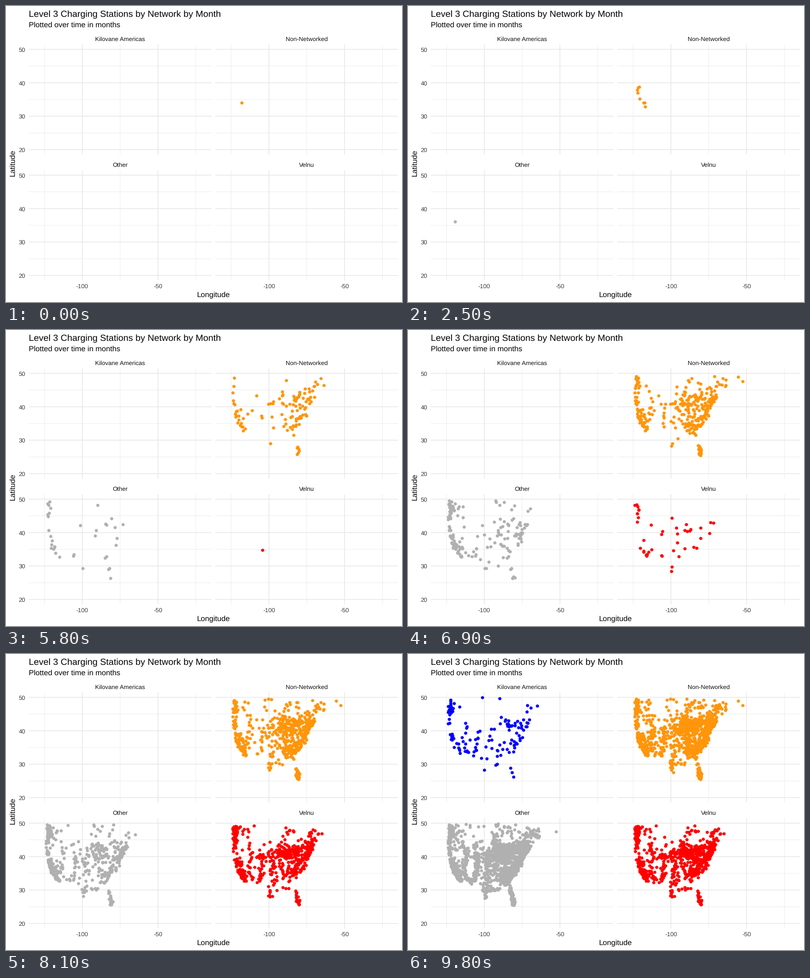
A matplotlib script for the animation above (10000 ms loop, 800 by 600 pixels).

```python
import matplotlib.pyplot as plt
import numpy as np
from matplotlib.animation import FuncAnimation
from matplotlib.collections import LineCollection
from matplotlib.path import Path

W, H, DPI = 800, 600, 100
STEP, FRAMES = 100, 100
PANEL_W, PANEL_H = 369.4, 223.2
LEFT, TOP = 45.9, 77.9
COL, ROW = 377.05, 255

rng = np.random.default_rng(5)
plt.rcParams["font.family"] = "Liberation Sans"
plt.rcParams["text.hinting"] = "none"

# Panel name, colour, column, row
PANELS = {
    "fast": ("Kilovane Americas", "#0000ff", 0, 0),
    "free": ("Non-Networked", "#ff950a", 1, 0),
    "other": ("Other", "#b0b0b0", 0, 1),
    "brand": ("Velnu", "#ff0000", 1, 1),
}

# Map positions are pixels of the first panel.
LAND = Path([
    (74, 92), (80, 87.5), (245, 87.5), (272, 104), (270, 115), (255, 126),
    (244, 142), (236, 152), (231, 164), (230, 178), (215, 197), (207, 208),
    (208, 222), (217, 244), (215, 255), (210, 254), (204, 225), (182, 226),
    (166, 225), (157, 246), (148, 224), (122, 212), (103, 205), (90, 186),
    (81, 152), (80, 105),
])

# Routes with stations along them: weight, spread, key points
WEST = [
    (5, 2.5, [(85, 95), (87, 108), (83, 120)]),
    (1.5, 2.5, [(83, 120), (82, 150), (85, 165)]),
    (6, 2.5, [(86, 163), (89, 180), (97, 195), (107, 204)]),
    (3, 3, [(87, 168), (93, 163), (103, 194)]),
    (1.5, 7, [(88, 95), (108, 102), (96, 120), (97, 160)]),
]
MID = [
    (3, 3, [(110, 130), (119, 152), (110, 180), (118, 200), (131, 207)]),
    (3, 2.5, [(128, 158), (140, 150), (140, 164), (135, 208)]),
    (3, 5, [(160, 140), (161, 190), (160, 213), (152, 222)]),
    (1.2, 2, [(157, 240), (154, 223), (185, 222)]),
    (1.5, 9, [(120, 140), (140, 120), (150, 165), (125, 190)]),
    (0.5, 4, [(105, 92), (170, 92), (235, 92)]),
]
EAST = [
    (4, 4, [(240, 135), (236, 147), (225, 161)]),
    (4, 6, [(175, 128), (188, 143), (202, 140), (218, 138), (237, 124)]),
    (5, 10, [(170, 152), (190, 152), (215, 155)]),
    (4, 7, [(225, 165), (216, 184), (203, 190), (192, 205)]),
    (2.5, 11, [(178, 175), (190, 195), (205, 175)]),
    (1.8, 2, [(207, 222), (212, 238), (215, 253), (208, 242)]),
    (1, 5, [(237, 124), (247, 103), (262, 112)]),
    (0.7, 5, [(175, 118), (200, 100), (225, 108)]),
]

# Panel, start, end, new stations in the west, the middle and the east
GROWTH = [
    ("free", 4300, 5800, 14, 12, 78),
    ("free", 5800, 6900, 48, 18, 150),
    ("free", 6900, 8100, 32, 45, 150),
    ("free", 8100, 9800, 70, 120, 300),
    ("other", 4500, 5800, 16, 5, 14),
    ("other", 5800, 6900, 60, 20, 50),
    ("other", 6900, 8100, 85, 55, 150),
    ("other", 8100, 9800, 200, 230, 850),
    ("brand", 5900, 6900, 17, 13, 15),
    ("brand", 6900, 8100, 110, 90, 310),
    ("brand", 8100, 9800, 35, 60, 110),
    ("fast", 8700, 9800, 42, 35, 60),
]

# First and outlying stations: x, y, opening time
stations = {
    "free": [
        (98.5, 196, 0), (102, 203.5, 900), (90, 164, 1000), (86, 170, 1500),
        (88, 165, 1600), (87, 176, 1700), (91, 187.5, 1900),
        (101, 195.5, 2200), (236, 125, 2900), (265, 112, 3400),
        (215, 131.5, 3700), (216, 125.5, 3900), (290, 95, 6400),
        (298.5, 104, 6800),
    ],
    "other": [(90, 162.5, 4500), (298.5, 104.5, 9400)],
    "brand": [],
    "fast": [],
}

# Lone dots gliding between two places: start, end, times
GLIDES = {
    "free": ((98.5, 196), (90, 164), 100, 1000),
    "other": ((98.3, 194.2), (90.4, 164.6), 1000, 4500),
    "brand": ((96, 190), (163.5, 191.5), 5600, 5900),
}


def along(points, u):
    """Positions at shares u of the length of a polyline."""
    points = np.array(points, float)
    steps = np.hypot(*np.diff(points, axis=0).T)
    s = np.append(0, np.cumsum(steps)) / steps.sum()
    return np.column_stack([np.interp(u, s, p) for p in points.T])


def scatter(routes, count):
    """Random places on land near the routes."""
    weights = np.array([r[0] for r in routes])
    shares = rng.multinomial(4 * count, weights / weights.sum())
    places = np.vstack([
        along(points, rng.random(n)) + rng.normal(0, spread, (n, 2))
        for n, (_, spread, points) in zip(shares, routes)])
    places = places[LAND.contains_points(places)]
    return rng.permutation(places)[:count]


for key, start, end, *counts in GROWTH:
    for routes, count in zip((WEST, MID, EAST), counts):
        places = scatter(routes, count)
        # More of them open towards the end
        times = start + (end - start) * np.sqrt(rng.random(len(places)))
        stations[key].extend(np.column_stack([places, times]))
stations = {key: np.array(rows) for key, rows in stations.items()}

fig = plt.figure(figsize=(W / DPI, H / DPI), dpi=DPI, facecolor="white")
ax = fig.add_axes([0, 0, 1, 1])
ax.set_axis_off()


def lon_x(lon):
    return 154.2 + (lon + 100) * 3.054


def lat_y(lat):
    return 87.8 + (50 - lat) * 6.78


def label(x, y, text, size, color="black", **kw):
    ax.text(x, y, text, fontsize=size, color=color, va="baseline", **kw)


def grid(dx, dy, lons, lats, width):
    x0, y0 = LEFT + dx, TOP + dy
    lines = [[(lon_x(v) + dx, y0), (lon_x(v) + dx, y0 + PANEL_H)]
             for v in lons]
    lines += [[(x0, lat_y(v) + dy), (x0 + PANEL_W, lat_y(v) + dy)]
              for v in lats]
    ax.add_collection(LineCollection(
        lines, colors="#e7e7e7", linewidths=width, capstyle="butt",
        snap=False, zorder=1))


dots = {}
for key, (name, color, col, row) in PANELS.items():
    dx, dy = col * COL, row * ROW
    grid(dx, dy, (-125, -75, -25), (45, 35, 25), 0.533)
    grid(dx, dy, (-100, -50), (50, 40, 30, 20), 1.067)
    label(LEFT + dx + PANEL_W / 2, 71 + dy, name, 8.8, "#101010", ha="center")
    if row == 1:
        for lon in (-100, -50):
            label(lon_x(lon) + dx, 572, str(lon), 8.8, "#3c3c3c", ha="center")
    if col == 0:
        for lat in (50, 40, 30, 20):
            label(39.3, lat_y(lat) + dy + 4.8, str(lat), 8.8, "#3c3c3c",
                  ha="right")
    dots[key] = ax.scatter([], [], s=21.2, color=color, linewidths=0, zorder=2)

label(46, 21, "Level 3 Charging Stations by Network by Month", 13.2)
label(46, 44, "Plotted over time in months", 11)
label(419, 590, "Longitude", 11, ha="center")
label(18.5, 317.5, "Latitude", 11, ha="center", rotation=90,
      rotation_mode="anchor")
ax.set_xlim(0, W)
ax.set_ylim(H, 0)


def update(i):
    t = min(i, FRAMES - 2) * STEP
    for key, art in dots.items():
        _, _, col, row = PANELS[key]
        data = stations[key]
        points = data[data[:, 2] <= t, :2]
        if key in GLIDES:
            a, b, start, end = GLIDES[key]
            if start <= t < end:
                k = (t - start) / (end - start)
                points = np.vstack([points, along((a, b), [k])])
        art.set_offsets(points + (col * COL, row * ROW))
    return list(dots.values())


anim = FuncAnimation(fig, update, frames=FRAMES, interval=STEP, repeat=True,
                     repeat_delay=0, blit=False)
plt.show()
```
